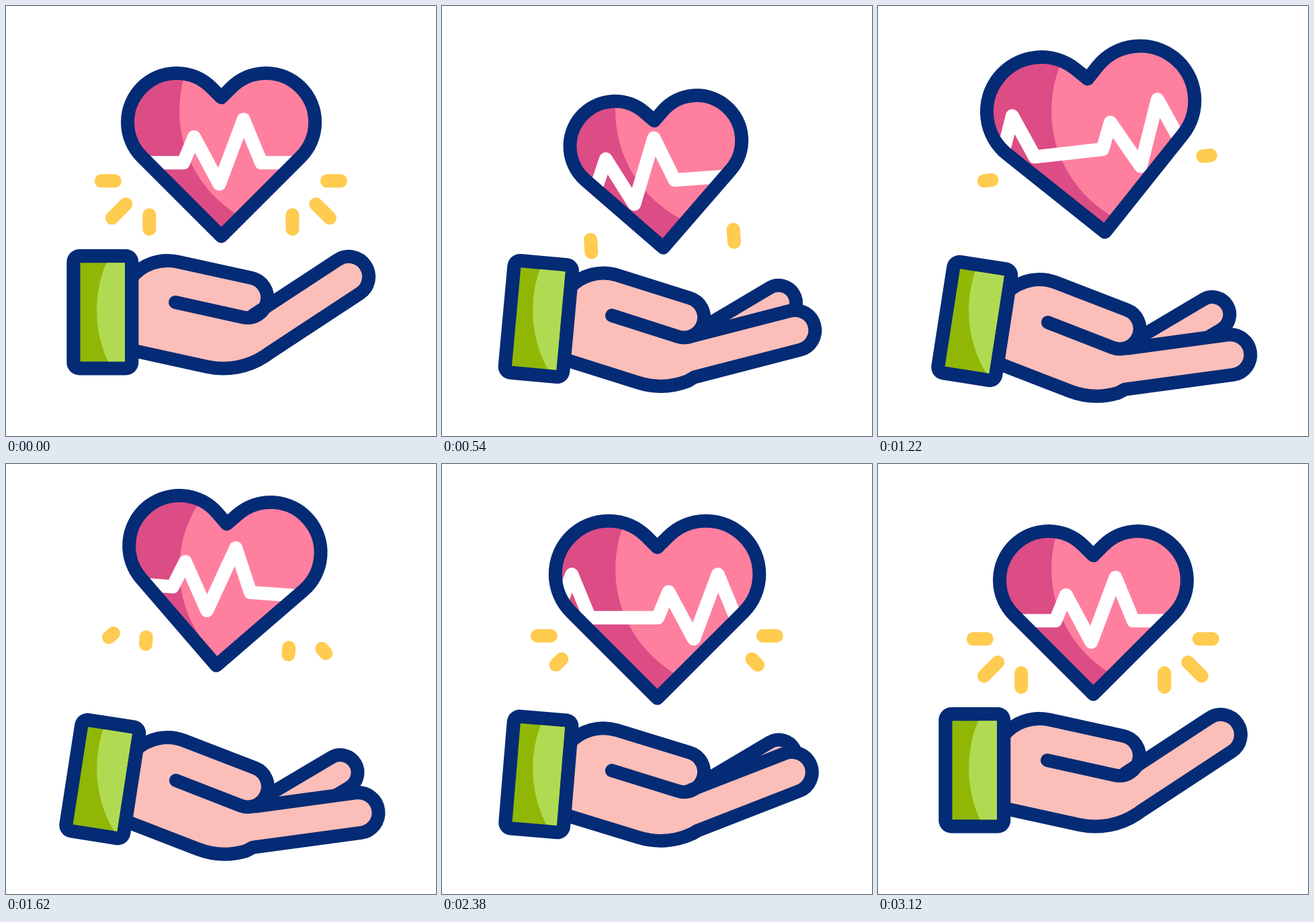
Recreate the animation shown at these times as an HTML page with a canvas. Size 640x640 px, loop 3600 ms.

```html
<!DOCTYPE html>
<html lang="en">
<head>
<meta charset="utf-8">
<title>Heart care</title>
<style>
html, body { margin: 0; width: 100%; height: 100%; overflow: hidden; background: #fff; }
canvas { display: block; }
</style>
</head>
<body>
<canvas id="stage" width="640" height="640"></canvas>
<script>
const ctx = document.getElementById('stage').getContext('2d');
const LOOP = 3600, ACTIVE = 3120, STEP = 20;
const NAVY = '#042b75', SKIN = '#fcbeb9', YELLOW = '#ffcb50';
const PINK = '#ff7f9f', ROSE = '#dc4c85', LIME = '#b1da53', GREEN = '#90b706';

const rad = d => d * Math.PI / 180;
const ramp = (t, from, to) => Math.min(1, Math.max(0, (t - from) / (to - from)));
const ease = (t, from, to) => { const x = ramp(t, from, to); return x * x * (3 - 2 * x); };
const hold = (t, a, b, c, d) => ease(t, a, b) - ease(t, c, d);

// Heart: sink with the hand, toss up, fall, bounce, settle.
const heartX = t => 2.2 * hold(t, 0, 1200, 1400, 2100);
const heartY = t => 32 * ease(t, 0, 712) - 80 * ease(t, 712, 1570) + 64 * ease(t, 1540, 2185)
  - 36 * ease(t, 2185, 2540) + 20 * ease(t, 2540, 3080);
const heartTurn = t => -7.3 * ease(t, 0, 1000) + 11.9 * ease(t, 1130, 1680) - 4.6 * ease(t, 1680, 2090);
const heartSize = t => 1 - 0.085 * ease(t, 0, 600) + 0.205 * ease(t, 600, 1300)
  - 0.105 * ease(t, 1300, 1690) + 0.075 * ease(t, 1690, 2450) - 0.09 * ease(t, 2450, 3080);

const handTurn = t => 8.8 * hold(t, 0, 960, 1886, 2930);
const handSink = t => hold(t, 0, 815, 1885, 2836);

function stroke(color) {
  ctx.strokeStyle = color;
  ctx.lineWidth = 20;
  ctx.stroke();
}

function disc(x, y, r, color) {
  ctx.beginPath();
  ctx.arc(x, y, r, 0, 7);
  ctx.fillStyle = color;
  ctx.fill();
}

function fillAll(color) {
  ctx.fillStyle = color;
  ctx.fillRect(0, 0, 640, 640);
}

// ---- heart ----
const HX = 320.5, HY = 221.35;

function placeHeart(t) {
  ctx.setTransform(1, 0, 0, 1, HX + heartX(t), HY + heartY(t));
  ctx.rotate(rad(heartTurn(t)));
}

function heartPath(s) {
  ctx.beginPath();
  ctx.moveTo(0, -85.05 * s);
  ctx.arc(66.5 * s, -48.35 * s, 73 * s, rad(-135), rad(45));
  ctx.lineTo(0, 121.35 * s);
  ctx.arc(-66.5 * s, -48.35 * s, 73 * s, rad(135), rad(315));
  ctx.closePath();
}

// One heartbeat, relative to the heart's centre.
const BEAT = [[-56.5, 12], [-40.5, -26.4], [-3, 43.6], [33, -52.4], [59.5, 12]];
const BEAT_GAP = 217.5;

function pulse(t) {
  const shift = -2 * BEAT_GAP * ease(t, 0, 3080);
  ctx.beginPath();
  for (let k = -1; k < 4; k++)
    for (const [x, y] of BEAT) ctx.lineTo(x + shift + k * BEAT_GAP, y);
  stroke('#fff');
}

function heart(t) {
  const s = heartSize(t);
  ctx.save();
  placeHeart(t);
  heartPath(s);
  ctx.clip();
  ctx.resetTransform();
  fillAll(ROSE);
  disc(439.5, 156, 181.5, PINK);
  placeHeart(t);
  pulse(t);
  ctx.restore();
  placeHeart(t);
  heartPath(s);
  stroke(NAVY);
}

// ---- rays: each starts at x, y from the heart's centre and turns 45° more ----
const RAYS = [{ x: 158, y: 39, size: 20 }, { x: 141.5, y: 73.6, size: 29 }, { x: 106.5, y: 89.6, size: 21 }];
const RAY_TIME = 175;

// Visible part of a ray: shrink outward, grow and shrink again, grow and stay.
function raySpan(i, t) {
  const run = from => ramp(t, from, from + RAY_TIME);
  const out = 108 + 207 * i, again = out + 1010, last = 2065 + 240 * i;
  if (t < again) return [run(out), 1];
  if (t < last) return [run(again + RAY_TIME), run(again)];
  return [0, run(last)];
}

function rays(t) {
  placeHeart(t);
  RAYS.forEach(({ x, y, size }, i) => {
    const [lo, hi] = raySpan(i, t);
    if (hi - lo < 0.001) return;
    const dx = size * Math.cos(rad(45 * i)), dy = size * Math.sin(rad(45 * i));
    for (const side of [-1, 1]) {
      ctx.beginPath();
      for (const p of [lo, hi]) ctx.lineTo(side * (x + dx * p) - 0.7, y + dy * p);
      stroke(YELLOW);
    }
  });
}

// ---- hand ----
const CUFF_X = 143.5, CUFF_Y = 455.5, KNUCKLE_X = 369.3, KNUCKLE_Y = 484.6;

function placeHand(t) {
  ctx.setTransform(1, 0, 0, 1, CUFF_X, CUFF_Y + 13.2 * handSink(t));
  ctx.rotate(rad(handTurn(t)));
  ctx.translate(-CUFF_X, -CUFF_Y);
}

// Outline of a finger around the knuckle, from its lower base to its upper base.
function finger(turn, reach, drop, r) {
  const a = rad(turn - 33.3), c = Math.cos(a), s = Math.sin(a);
  const at = (u, n) => [KNUCKLE_X + u * c - n * s, KNUCKLE_Y + u * s + n * c];
  ctx.lineTo(...at(0, drop + r));
  ctx.arc(...at(reach, drop), r, a + Math.PI / 2, a - Math.PI / 2, true);
  ctx.lineTo(...at(12, drop - r));
}

function palmPath(bend) {
  ctx.beginPath();
  ctx.moveTo(180, 510.8);
  ctx.arc(323.6, 427.5, 112, rad(102.3), rad(56.7 + bend / 2), true);
  finger(bend, 162.5, 9, 30);
}

function thumbPath() {
  ctx.beginPath();
  ctx.arc(240, 448, 69, rad(-142), rad(-77.7));
  ctx.arc(359, 434, 30, rad(-77.7), rad(102.3));
  ctx.lineTo(252, 441);
}

function hand(t) {
  const turn = handTurn(t), front = 25.6 * handSink(t);
  const bend = front - turn;
  placeHand(t);

  ctx.beginPath();
  finger(Math.min(front, 2.6) - turn, 153.5, 6.4, 26);
  ctx.fillStyle = SKIN;
  ctx.fill();
  stroke(NAVY);

  palmPath(bend);
  ctx.lineTo(352, 445);
  ctx.lineTo(252, 430);
  ctx.lineTo(180, 400);
  ctx.fill();
  thumbPath();
  ctx.lineTo(180, 460);
  ctx.fill();

  palmPath(bend);
  stroke(NAVY);
  thumbPath();
  stroke(NAVY);
}

function cuff(t) {
  ctx.save();
  placeHand(t);
  ctx.beginPath();
  ctx.roundRect(90.3, 362, 107, 187.5, 19);
  ctx.fillStyle = NAVY;
  ctx.fill();
  ctx.beginPath();
  ctx.rect(110.5, 382.3, 66.5, 147);
  ctx.clip();
  ctx.resetTransform();
  fillAll(GREEN);
  disc(317, 453, 182, LIME);
  ctx.restore();
}

function draw(t) {
  ctx.resetTransform();
  ctx.lineCap = ctx.lineJoin = 'round';
  fillAll('#fff');
  rays(t);
  heart(t);
  hand(t);
  cuff(t);
}

const start = performance.now();
function tick(now) {
  const t = Math.max(0, now - start) % LOOP;
  draw(Math.min(ACTIVE, Math.floor(t / STEP) * STEP));
  requestAnimationFrame(tick);
}
draw(0);
requestAnimationFrame(tick);
</script>
</body>
</html>
```
